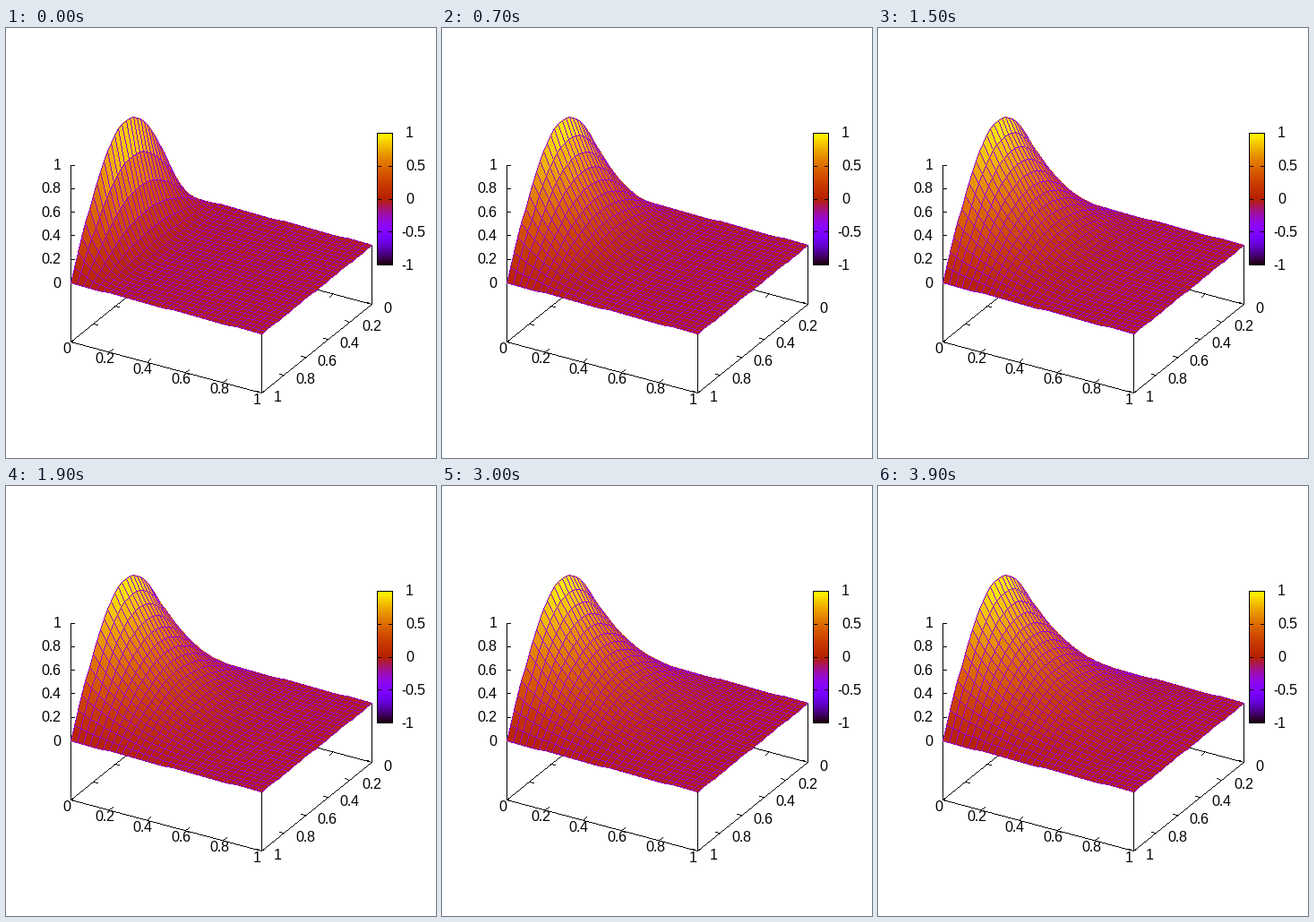
A matplotlib script for the animation above (4000 ms loop, 480 by 480 pixels).

```python
import numpy as np
import matplotlib.pyplot as plt
from matplotlib.animation import FuncAnimation

SIZE, DPI = 480, 100
PX = 72 / DPI                      # points per pixel
N = 30                             # grid cells per side
FRAMES, INTERVAL = 40, 100
FIRST_SWEEPS, SWEEPS_PER_FRAME = 15, 10
FLOOR = -0.5
MESH = (0x94, 0x00, 0xD3)

plt.rcParams.update({"font.family": "Liberation Sans",
                     "text.hinting": "default", "text.hinting_factor": 1})


def project(x, y, z):
    """Screen position, in pixels, of a point in the box."""
    return 195 + 213 * x - 123 * y, 185 + 57 * x + 99 * y - 131.5 * z


def palette(v):
    """Black-violet-red-yellow colours for v in 0..1."""
    v = np.clip(np.asarray(v, dtype=float), 0, 1)
    rgb = np.stack([np.sqrt(v), v ** 3, np.sin(2 * np.pi * v)], axis=-1)
    return np.rint(255 * np.clip(rgb, 0, 1)).astype(np.uint8)


def to_pixel(a):
    return np.floor(np.asarray(a) + 0.5).astype(int)


def relax(u):
    """One Jacobi sweep of Laplace's equation."""
    new = u.copy()
    new[1:-1, 1:-1] = (u[:-2, 1:-1] + u[2:, 1:-1]
                       + u[1:-1, :-2] + u[1:-1, 2:]) / 4
    return new


def solve():
    u = np.zeros((N + 1, N + 1))
    u[0] = np.sin(np.pi * grid)
    states = []
    for frame in range(FRAMES):
        for _ in range(SWEEPS_PER_FRAME if frame else FIRST_SWEEPS):
            u = relax(u)
        states.append(u)
    return states


def corners(a):
    """The four corner values of every cell, back cells first."""
    quad = [a[:-1, :-1], a[1:, :-1], a[1:, 1:], a[:-1, 1:]]
    return np.stack(quad, axis=-1).reshape(-1, 4)


def line_pixels(p, q):
    """Pixels of one-pixel lines from each p to each q, arrays of (n, 2)."""
    steps = np.maximum(np.abs(q - p).max(axis=1), 1)
    t = np.minimum(np.arange(steps.max() + 1) / steps[:, None], 1)
    return to_pixel(p[:, None] + (q - p)[:, None] * t[..., None])


def fill_pixels(quads):
    """Pixels covering each quad, by even steps along both sides."""
    a, b, c, d = (quads[:, i, None, None] for i in range(4))
    across = np.abs(np.concatenate([b - a, c - d])).max()
    along = np.abs(np.concatenate([d - a, c - b])).max()
    s = np.linspace(0, 1, across + 2)[:, None, None]
    t = np.linspace(0, 1, along + 2)[None, :, None]
    near, far = a + (b - a) * s, d + (c - d) * s
    return to_pixel(near + (far - near) * t).reshape(len(quads), -1, 2)


def add_line(start, end):
    p, q = to_pixel([start]), to_pixel([end])
    x, y = line_pixels(p, q)[0].T
    backdrop[y, x] = 0


def add_tick(start, dx, dy):
    add_line(start, (start[0] + dx, start[1] + dy))


def label(x, middle, text, align):
    ax.text(x, middle + 5, text, fontsize=16 * PX, ha=align, va="baseline")


def draw_box():
    left, front = project(0, 1, FLOOR), project(1, 1, FLOOR)
    right, back = project(1, 0, FLOOR), project(0, 0, FLOOR)
    for p, q in [(left, back), (back, right), (left, front), (front, right),
                 (left, project(0, 1, 1)), (front, project(1, 1, 0)),
                 (right, project(1, 0, 0))]:
        add_line(p, q)
    for v in np.arange(6) / 5:
        text = f"{v:g}"
        p = project(v, 1, FLOOR)
        add_tick(p, 4, -3.2)
        label(p[0] - 5, p[1] + 7.5, text, "center")
        add_tick(project(v, 0, FLOOR), -4, 3.2)

        p = project(1, v, FLOOR)
        add_tick(p, -5, -1.3)
        label(p[0] + 13, p[1] + 4.5, text, "left")
        add_tick(project(0, v, FLOOR), 5, 1.3)

        p = project(0, 1, v)
        add_tick(p, 4, 0)
        label(61, p[1], text, "right")


def draw_colorbar():
    x0, x1, top, bottom = 414, 431, 117, 264
    shades = np.linspace(1, 0, bottom - top + 1)
    backdrop[top:bottom + 1, x0:x1 + 1] = palette(shades)[:, None]
    for y in (top, bottom):
        add_line((x0, y), (x1, y))
    for x in (x0, x1):
        add_line((x, top), (x, bottom))
    for v in (1, 0.5, 0, -0.5, -1):
        y = (top + bottom) / 2 - v * (bottom - top) / 2
        add_tick((x0, y), 4, 0)
        add_tick((x1, y), -4, 0)
        label(440.5 if v < 0 else 445.5, y, f"{v:g}", "left")


def draw_surface(canvas, u):
    """Paint the cells back to front, each filled and then outlined."""
    points = to_pixel(project(gx, gy, u))
    quads = np.stack([corners(points[0]), corners(points[1])], axis=-1)
    a, b, c, d = (quads[:, i] for i in range(4))
    fill = fill_pixels(quads)
    edges = [line_pixels(*ends) for ends in ((a, b), (d, c), (a, d), (b, c))]
    pixels = np.concatenate([fill] + edges, axis=1)

    # Owner of each pixel: -1 nothing, 0 mesh line, else cell number + 1.
    paint = np.zeros(pixels.shape[:2], dtype=int)
    paint[:, :fill.shape[1]] = np.arange(1, len(quads) + 1)[:, None]
    owner = np.full((SIZE, SIZE), -1)
    owner[pixels[..., 1].ravel(), pixels[..., 0].ravel()] = paint.ravel()

    shades = palette((corners(u).mean(axis=1) + 1) / 2)
    colours = np.vstack([np.uint8([MESH]), shades])
    covered = owner >= 0
    canvas[covered] = colours[owner[covered]]


fig = plt.figure(figsize=(SIZE / DPI, SIZE / DPI), dpi=DPI, facecolor="white")
ax = fig.add_axes([0, 0, 1, 1])
ax.axis("off")

grid = np.linspace(0, 1, N + 1)
gx, gy = np.meshgrid(grid, grid, indexing="ij")
states = solve()

backdrop = np.full((SIZE, SIZE, 3), 255, dtype=np.uint8)
draw_box()
draw_colorbar()
picture = ax.imshow(backdrop, interpolation="nearest", aspect="auto")


def update(frame):
    canvas = backdrop.copy()
    draw_surface(canvas, states[frame])
    picture.set_data(canvas)
    return [picture]


anim = FuncAnimation(fig, update, frames=FRAMES, interval=INTERVAL,
                     repeat=True, repeat_delay=0)
plt.show()
```
